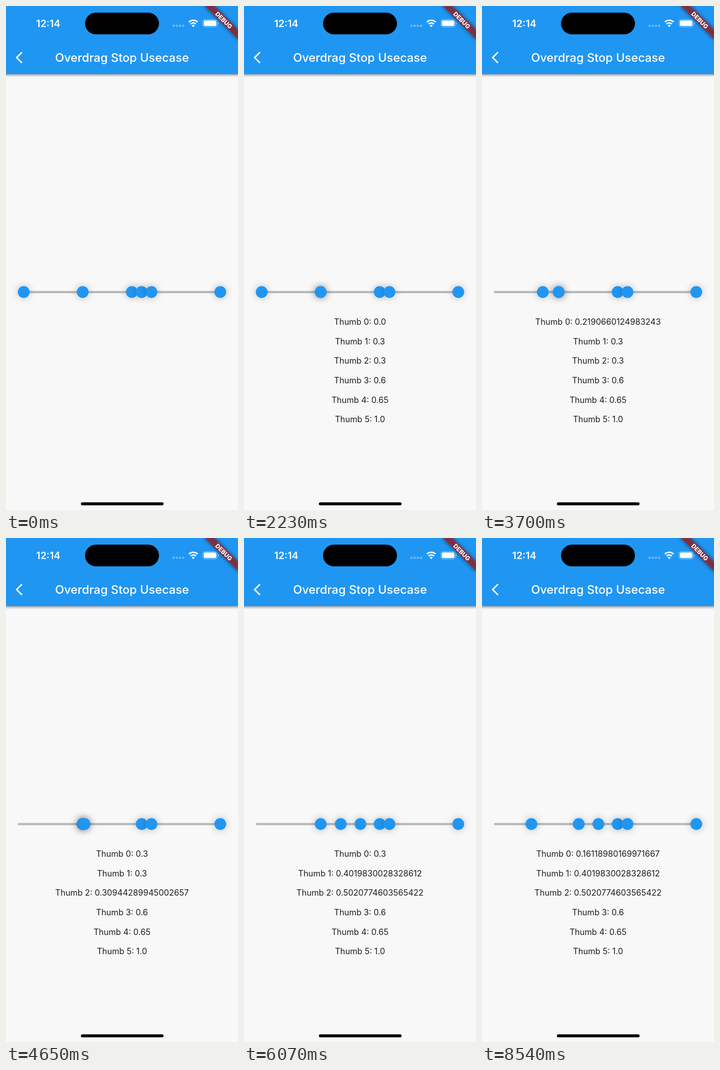
Recreate the animation shown at these times as an HTML page. Size 508 by 1102 pixels, loop 8590 ms.

```html
<!DOCTYPE html>
<html lang="en">
<head>
<meta charset="utf-8">
<title>Overdrag Stop Usecase</title>
<style>
  html, body { margin: 0; width: 100%; height: 100%; overflow: hidden; background: #f8f8f8; }
  svg { display: block; width: 100vw; height: 100vh; font-family: Inter, Roboto, sans-serif; }
  .title { font-size: 25.85px; font-weight: 500; fill: #fff; }
  .clock { font-size: 21.6px; font-weight: 600; fill: #fff; }
  .debug { font-size: 10.2px; font-weight: 800; fill: #fff; }
  #labels { font-size: 18.1px; fill: #1f1f1f; }
  text { text-anchor: middle; }
</style>
</head>
<body>
<svg viewBox="0 0 508 1102">
  <defs>
    <filter id="soft" x="-150%" y="-150%" width="400%" height="400%"><feGaussianBlur stdDeviation="8"/></filter>
    <filter id="barBlur" x="-5%" y="-20%" width="110%" height="140%"><feGaussianBlur stdDeviation="2.6"/></filter>
    <filter id="ribbonBlur" x="-30%" y="-150%" width="160%" height="400%"><feGaussianBlur stdDeviation="3.9"/></filter>
    <g id="thumb">
      <circle r="12.9" fill="#000" fill-opacity=".26" filter="url(#soft)"/>
      <circle r="12.9" fill="#2096f3"/>
    </g>
  </defs>
  <rect width="508" height="1102" fill="#f8f8f8"/>

  <!-- app bar -->
  <rect x="-10" y="20" width="528" height="131.5" fill="#000" fill-opacity=".4" filter="url(#barBlur)"/>
  <rect width="508" height="149" fill="#2096f3"/>
  <path transform="translate(21 97.2) scale(1.2926)" d="M11.67 3.87 9.9 2.1 0 12l9.9 9.9 1.77-1.77L3.54 12z" fill="#fff"/>
  <text class="title" x="254" y="121.7">Overdrag Stop Usecase</text>

  <!-- status bar -->
  <text class="clock" x="92.5" y="46">12:14</text>
  <rect x="173" y="14.5" width="162" height="47.5" rx="23.75"/>
  <g fill="#fff" fill-opacity=".35">
    <rect x="364.6" y="41" width="4.6" height="4.6" rx="1.3"/>
    <rect x="371.6" y="41" width="4.6" height="4.6" rx="1.3"/>
    <rect x="378.6" y="41" width="4.6" height="4.6" rx="1.3"/>
    <rect x="385.6" y="41" width="4.6" height="4.6" rx="1.3"/>
  </g>
  <g fill="none" stroke="#fff" stroke-width="3.1">
    <path d="M400.3 35.2A13.9 13.9 0 0 1 419.7 35.2"/>
    <path d="M404 39.4A8.6 8.6 0 0 1 416 39.4"/>
  </g>
  <path d="M406.6 42.6A5 5 0 0 1 413.4 42.6L410 46.2z" fill="#fff"/>
  <rect x="431.2" y="29.6" width="31.4" height="16.2" rx="5" fill="none" stroke="#fff" stroke-opacity=".45" stroke-width="1.3"/>
  <rect x="433.2" y="31.6" width="27.4" height="12.2" rx="3.2" fill="#fff"/>
  <path d="M464.2 35.2q2 1 2 2.7t-2 2.7z" fill="#fff" fill-opacity=".5"/>

  <!-- debug ribbon -->
  <g transform="translate(508 0) rotate(45) scale(1.2926)">
    <rect x="-40" y="28" width="80" height="12" fill="#000" fill-opacity=".5" filter="url(#ribbonBlur)"/>
    <rect x="-40" y="28" width="80" height="12" fill="#b71c1c" fill-opacity=".627"/>
    <text class="debug" x="0" y="37.7">DEBUG</text>
  </g>

  <!-- slider -->
  <rect x="25.9" y="622.9" width="456.3" height="5.2" rx="2.6" fill="#bababa"/>
  <g id="thumbs"></g>
  <g id="labels"></g>

  <rect x="164" y="1085.3" width="181" height="6.4" rx="3.2"/>
</svg>
<script>
  const LOOP = 8590, FIRST_DRAG = 1470;
  const initial = [0, 0.3, 0.55, 0.6, 0.65, 1];

  const linear = p => p;
  const easeIn = p => p ** 1.4;
  const smooth = p => p * p * (3 - 2 * p);

  // thumb, first update (ms), last update (ms), updates, from, to, easing
  const drags = [
    [2, 1470, 2230, 17, 0.54622083517470562, 0.3, easeIn],
    [0, 3080, 3320, 6, 0.00188857412653447, 0.05854576910521424, easeIn],
    [0, 3370, 3890, 12, 0.07743153437039182, 0.3, linear],
    [2, 4650, 4980, 8, 0.30944289945002657, 0.5020774603565422, smooth],
    [1, 5690, 6070, 9, 0.3009442726545901, 0.4019830028328612, smooth],
    [0, 6600, 6830, 6, 0.29811145427053819, 0.22067988668555238, easeIn],
    [0, 6880, 6930, 2, 0.18951841359773371, 0.16874409820585463, linear],
    [0, 7070, 7120, 2, 0.16496694995278565, 0.16118980169971667, linear]
  ];

  const make = (tag, parent) =>
    parent.appendChild(document.createElementNS("http://www.w3.org/2000/svg", tag));

  const labels = document.getElementById("labels");
  const thumbLayer = document.getElementById("thumbs");
  const thumbs = initial.map(() => {
    const thumb = make("use", thumbLayer);
    thumb.setAttribute("href", "#thumb");
    return thumb;
  });
  const lines = initial.map((_, i) => {
    const line = make("text", labels);
    line.setAttribute("x", 254);
    line.setAttribute("y", 697 + i * 42.66);
    return line;
  });

  // Drag updates arrive in discrete steps, so progress is quantised.
  function dragValue(t, [, start, end, count, from, to, ease]) {
    const step = Math.floor((t - start) / (end - start) * (count - 1) + 0.13);
    if (step >= count - 1) return to;
    return from + (to - from) * ease(step / (count - 1));
  }

  const format = v => Number.isInteger(v) ? v.toFixed(1) : String(v);

  function draw(now) {
    const t = now % LOOP;
    const values = initial.slice();
    for (const drag of drags) {
      if (t >= drag[1]) values[drag[0]] = dragValue(t, drag);
    }
    values.forEach((v, i) => {
      thumbs[i].setAttribute("transform", `translate(${38.8 + v * 430.4} 625.5)`);
      lines[i].textContent = `Thumb ${i}: ${format(v)}`;
    });
    labels.setAttribute("visibility", t >= FIRST_DRAG ? "visible" : "hidden");
  }

  let origin = null;
  function tick(now) {
    origin ??= now;
    draw(now - origin);
    requestAnimationFrame(tick);
  }
  draw(0);
  requestAnimationFrame(tick);
</script>
</body>
</html>
```
